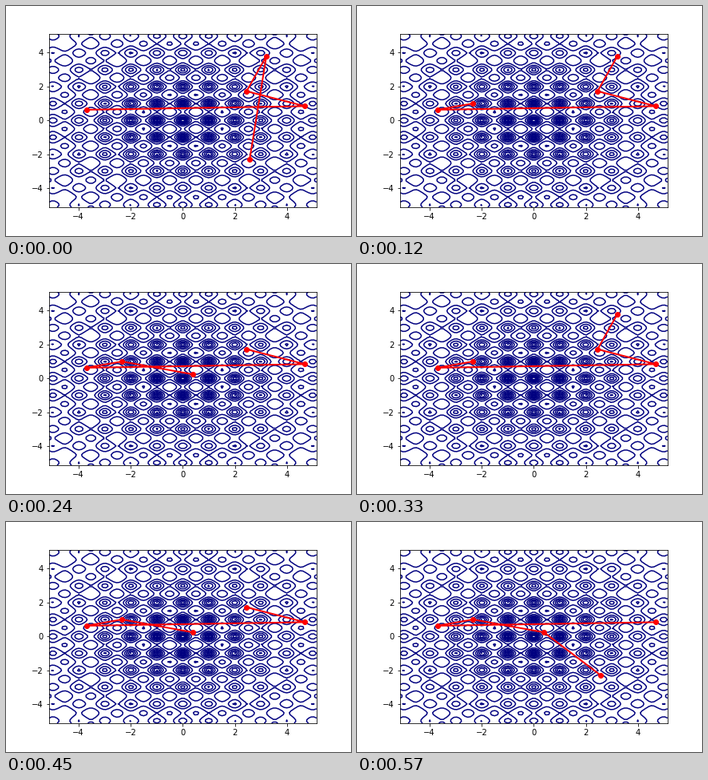
Animation of 432x288 px, one loop 0.6 s. Source, as a matplotlib script:

```python
import numpy as np
import matplotlib.pyplot as plt
from matplotlib.animation import FuncAnimation

FRAMES, INTERVAL = 20, 30
BOUND = 5.12
TRAIL = 5  # points visible at once

# Corners of the closed path
PX = np.array([-3.69, 4.68, 2.44, 3.2, 2.56, 0.39, -2.33])
PY = np.array([0.63, 0.84, 1.72, 3.79, -2.29, 0.24, 1.0])


def rastrigin(x, y):
    return 20 + sum(v**2 - 10 * np.cos(2 * np.pi * v) for v in (x, y))


fig, ax = plt.subplots(figsize=(6, 4), dpi=72)
fig.subplots_adjust(left=0.125, right=0.9, bottom=0.125, top=0.88)

axis = np.linspace(-BOUND, BOUND, 100)
x, y = np.meshgrid(axis, axis)
ax.contour(x, y, rastrigin(x, y), levels=np.logspace(0, 5, 35), cmap="jet")
ax.set_xlim(-BOUND, BOUND)
ax.set_ylim(-BOUND, BOUND)

line, = ax.plot([], [], "r-o", lw=2)


def update(i):
    # Each step shows the next chunk of the closed path.
    idx = (TRAIL * i + np.arange(TRAIL)) % len(PX)
    line.set_data(PX[idx], PY[idx])
    return line,


anim = FuncAnimation(fig, update, frames=FRAMES, interval=INTERVAL,
                     blit=True, repeat=True, repeat_delay=0)
plt.show()
```
